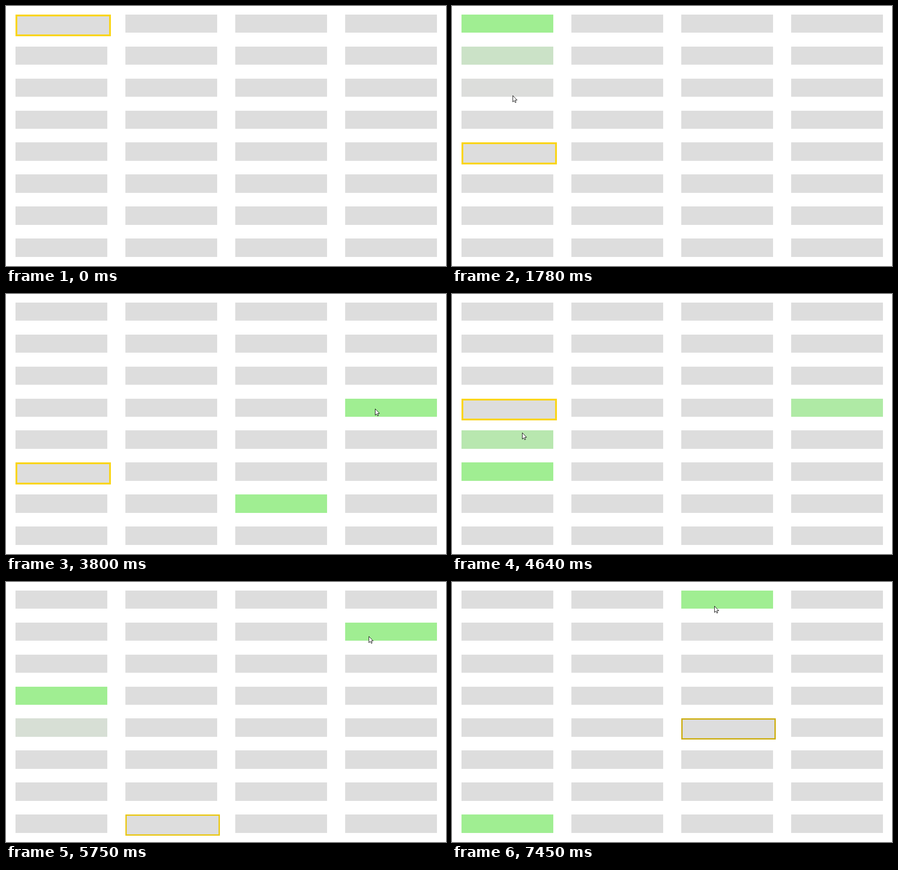
An HTML page with a canvas that plays this animation: 973 by 576 pixels, repeating every 7540 ms.

```html
<!DOCTYPE html>
<html lang="en">
<head>
<meta charset="utf-8">
<title>Hover grid</title>
<style>
  html, body { margin: 0; width: 100%; height: 100%; overflow: hidden; background: #fff; }
  canvas { display: block; }
</style>
</head>
<body>
<canvas id="stage" width="973" height="576"></canvas>
<script>
const ctx = document.getElementById('stage').getContext('2d');
const LOOP = 7540, GREY = [221, 221, 221], GREEN = [160, 238, 146], GOLD = [250, 213, 24];
const BORDER = 4, GROW = 250, FADE_IN = 80;

// Bursts of movement: start, end, number of steps
const bursts = [
  [920, 1320, 6], [1620, 2230, 9], [2470, 3180, 10], [3330, 3800, 7], [3940, 4400, 7],
  [4550, 5270, 10], [5340, 6050, 10], [6130, 6280, 3], [6440, 6820, 6], [6990, 7450, 7]
];

// Framed cell: time, column, row
const targets = [
  [-999, 0, 0], [1000, 0, 4], [1880, 2, 6], [2855, 3, 3], [3520, 0, 5], [4180, 0, 3],
  [4720, 3, 1], [5500, 1, 7], [6040, 0, 7], [6560, 2, 0], [7245, 2, 4]
];

// Green cells: column, row, enter, fade start, fade end, peak
const glows = [
  [0, 0, 1000, 1830, 2230, 1], [0, 1, 1700, 1880, 2230, .32], [0, 2, 1765, 1930, 2230, .25],
  [0, 3, 1830, 1980, 2230, .2], [0, 4, 1880, 2900, 3180, 1], [0, 5, 2020, 2950, 3180, 1],
  [2, 6, 2855, 3900, 4400, 1], [3, 3, 3520, 4540, 4900, 1], [0, 5, 4180, 5100, 5500, 1],
  [0, 4, 4555, 5400, 5800, .65], [0, 3, 4720, 5800, 6050, 1], [3, 1, 5500, 6300, 6820, 1],
  [0, 7, 6560, 8000, 9000, 1], [2, 0, 7245, 8000, 9000, 1]
];

// Pointer path: time, x, y
const path = [
  [920, 19, 40], [1320, 115, 42], [1620, 117, 62], [1772, 134, 197], [1880, 142, 310],
  [2060, 150, 385], [2470, 155, 388], [2850, 560, 440], [2943, 625, 445], [3180, 655, 466],
  [3330, 660, 464], [3540, 770, 268], [3800, 816, 254], [3940, 810, 257], [4200, 230, 385],
  [4400, 150, 407], [4550, 151, 390], [4630, 155, 307], [4730, 158, 272], [5270, 165, 250],
  [5340, 190, 244], [5500, 752, 128], [5600, 822, 110], [5734, 803, 119], [5960, 430, 480],
  [6050, 359, 556], [6130, 359, 554], [6440, 359, 554], [6560, 230, 548], [6820, 181, 545],
  [6990, 184, 543], [7245, 470, 180], [7450, 580, 53]
];

const clamp = v => Math.max(0, Math.min(1, v));
const lerp = (a, b, k) => a + (b - a) * k;
const mix = (a, b, k) => `rgb(${a.map((v, i) => Math.round(lerp(v, b[i], k)))})`;
const lastBefore = (list, t) => list.findLastIndex(item => item[0] <= t);
const pointer = new Path2D('M.5 .5V14.5L3.6 11.5L5.8 16L7.8 15.1L5.8 10.5H10Z');

function stepped(t) {
  const burst = bursts[lastBefore(bursts, t + 8)];
  if (!burst) return 0;
  const [start, end, count] = burst, dt = (end - start) / (count - 1);
  return start + dt * Math.min(count - 1, Math.floor((t + 8 - start) / dt));
}

function green(col, row, t) {
  return Math.max(0, ...glows.filter(g => g[0] === col && g[1] === row).map(
    ([, , enter, out, end, peak]) =>
      peak * clamp((t - enter) / FADE_IN) * (1 - clamp((t - out) / (end - out)))));
}

function drawCell(col, row, t, target) {
  const x = 21 + 243 * col, top = 18.8 + 70.9 * row;
  const y = Math.round(top), w = 203, h = Math.round(top + 40.5) - y;
  const framed = target[1] === col && target[2] === row;
  const grown = framed ? clamp((t - target[0]) / GROW) : 0;
  const b = Math.floor(BORDER * grown);
  if (b) {
    ctx.fillStyle = mix([0, 0, 0], GOLD, grown);
    ctx.fillRect(x, y, w + 2 * b, Math.round(top + 40.5 + 2 * b) - y);
  }
  ctx.fillStyle = mix(GREY, GREEN, framed ? 0 : green(col, row, t));
  ctx.fillRect(x + b, y + b, w, h);
}

function drawPointer(t) {
  const i = lastBefore(path, t);
  if (i < 0) return;
  const a = path[i], b = path[i + 1] || a, k = clamp((t - a[0]) / (b[0] - a[0] || 1));
  ctx.save();
  ctx.translate(Math.round(lerp(a[1], b[1], k)), Math.round(lerp(a[2], b[2], k)));
  ctx.fillStyle = '#fff';
  ctx.strokeStyle = '#000';
  ctx.fill(pointer);
  ctx.stroke(pointer);
  ctx.restore();
}

function draw() {
  const t = stepped(performance.now() % LOOP);
  const target = targets[lastBefore(targets, t)];
  ctx.fillStyle = '#fff';
  ctx.fillRect(0, 0, 973, 576);
  for (let row = 0; row < 8; row++)
    for (let col = 0; col < 4; col++) drawCell(col, row, t, target);
  drawPointer(t);
  requestAnimationFrame(draw);
}
draw();
</script>
</body>
</html>
```
